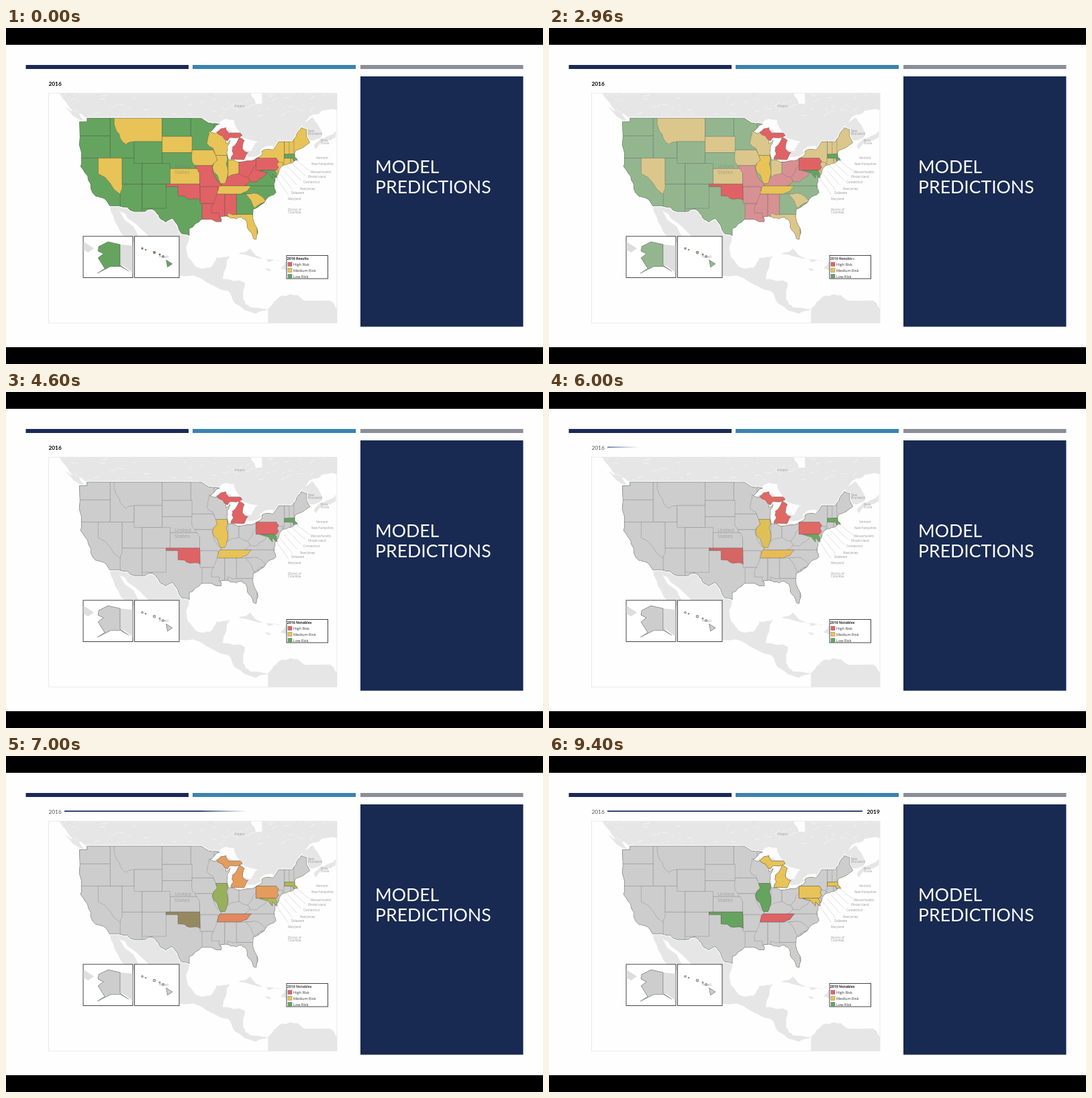
An HTML page that plays this animation: 800 px wide and 500 px high, repeating every 9480 ms.

```html
<!DOCTYPE html>
<html lang="en">
<head>
<meta charset="utf-8">
<title>Model predictions</title>
<style>
  html, body { margin: 0; width: 100%; height: 100%; overflow: hidden; background: #000; }
  svg { display: block; width: 100%; height: 100%; }
  text { font-family: "Open Sans", sans-serif; }
  .title, .year { font-family: Lato, sans-serif; }
  .title { font-size: 26.6px; fill: #fff; }
  .year { font-size: 8.3px; }
  .bold { font-weight: 700; }
  .legend { font-size: 5.6px; fill: #333; }
  .heading { font-size: 5.2px; font-weight: 700; fill: #222; }
  .place { font-size: 4.4px; fill: #999; }
  .country { font-size: 8px; fill: #777; opacity: .5; }
  .states { stroke: #444b46; stroke-opacity: .5; stroke-width: .7; stroke-linejoin: round; }
  #grey { fill: #cdcdcd; stroke: #777; }
</style>
</head>
<body>
<svg viewBox="0 0 800 500" preserveAspectRatio="none">
  <defs>
    <clipPath id="frame"><path d="M64 97H493V439H64Z"/></clipPath>
    <clipPath id="inside"></clipPath>
    <linearGradient id="wipe" gradientUnits="userSpaceOnUse" y1="0" y2="0">
      <stop offset="0" stop-color="#1b2d5c"/>
      <stop offset="1" stop-color="#2f5f95" stop-opacity="0"/>
    </linearGradient>
  </defs>
  <rect y="25" width="800" height="450" fill="#fefefe"/>
  <path fill="#1a2a54" d="M29.500 55H272V61H29.500Z"/>
  <path fill="#3a83ae" d="M278 55H521V61H278Z"/>
  <path fill="#8b8e96" d="M528 55H770.500V61H528Z"/>
  <path fill="#182952" d="M528 72H770.500V444.500H528Z"/>
  <text class="title" x="550" y="216">MODEL</text>
  <text class="title" x="550" y="245.500">PREDICTIONS</text>

  <g clip-path="url(#frame)">
    <g id="land" fill="#e6e6e6"></g>
    <g id="water" fill="#fdfdfd"></g>
    <g id="halo" fill="#fff" stroke="#fff" stroke-width="2.800"></g>
  </g>
  <rect x="63.500" y="97" width="429.500" height="342" fill="none" stroke="#e4e4e4" stroke-width=".8"/>

  <g fill="#fff" stroke="#444">
    <rect x="115" y="310" width="74" height="61.500"/>
    <rect x="191.500" y="310" width="66.500" height="61.500"/>
    <rect x="418" y="338.500" width="61.500" height="34.500"/>
  </g>
  <path fill="#dedede" d="M170 322L188.500 324V364L175 354 170 353ZM115.500 318L131 328 122 334 115.500 330Z"/>

  <g class="states">
    <g clip-path="url(#inside)"><g id="before"></g><g id="grey"></g></g>
    <g id="coast" fill="none"></g>
    <g id="notable"></g>
    <g id="later"></g>
  </g>
  <g id="labels"></g>

  <text class="year bold" id="yearBold" x="63.500" y="85.500">2016</text>
  <text class="year" id="yearPlain" x="63.500" y="85.500" fill="#555">2016</text>
  <path d="M87 81.200H467V82.900H87Z" fill="url(#wipe)"/>
  <text class="year bold" id="yearEnd" x="473.500" y="85.500">2019</text>

  <g class="heading">
    <text id="results" x="418.800" y="345">2016 Results</text>
    <text id="notables" x="418.800" y="345">2016 Notables</text>
    <text id="notablesEnd" x="418.800" y="345">2019 Notables</text>
  </g>
  <g id="legend" class="legend"></g>
</svg>
<script>
const $ = id => document.getElementById(id);
const HIGH = "#e06265", MEDIUM = "#e8c357", LOW = "#65a45e";

let seed = 7;
const random = () => (seed = seed * 16807 % 2147483647) / 2147483647;

function add(parent, tag, attributes, text = "") {
  const node = document.createElementNS("http://www.w3.org/2000/svg", tag);
  for (const key in attributes) node.setAttribute(key, attributes[key]);
  node.textContent = text;
  $(parent).append(node);
}

// Mercator: degrees west and north to stage pixels.
const project = (west, north) =>
  [851.4 - 5.95 * west, 469.5 - 341 * Math.asinh(Math.tan(north * Math.PI / 180))];

// Splits slanted edges at a displaced midpoint; edges along a meridian or parallel stay straight.
const roughen = points => points.flatMap(([x, y], i) => {
  const [nextX, nextY] = points[(i + 1) % points.length];
  const dx = nextX - x, dy = nextY - y;
  if (Math.min(Math.abs(dx), Math.abs(dy)) < 0.8) return [[x, y]];
  const push = (random() - 0.5) * 0.28;
  return [[x, y], [x + dx / 2 - dy * push, y + dy / 2 + dx * push]];
});

// A closed path from "west north, west north, ...".
function shape(text) {
  const corners = text.split(",").map(pair => project(...pair.trim().split(" ").map(Number)));
  const points = roughen(roughen(corners));
  return "M" + points.map(p => p.map(v => v.toFixed(1)).join(" ")).join("L") + "Z";
}
const box = (west, north, east, south) =>
  shape(`${west} ${north}, ${east} ${north}, ${east} ${south}, ${west} ${south}`);
const dot = (x, y, r) => `M${x - r} ${y}a${r} ${r} 0 1 0 ${2 * r} 0a${r} ${r} 0 1 0 ${-2 * r} 0Z`;

const land = text => add("land", "path", { d: shape(text) });
const water = text => add("water", "path", { d: shape(text) });

// Later areas cover earlier ones; all are cut off at the coast.
function area(risk, d) {
  add("before", "path", { d, fill: risk });
  add("grey", "path", { d });
}
function notable(risk, later, d) {
  add("notable", "path", { d, fill: risk });
  add("later", "path", { d, fill: later });
}

// Canada, Mexico to Panama, South America, islands
land("133 54, 128 51.5, 123 49, 117 46, 84 45.8, 82.5 42, 74 44.5, 66 45.2, 64 46, 65 48, 66.5 49.1, 70 47, 67 49.3, 64 50.2, 59 50.3, 59 54");
land("66 44.3, 65.5 43.6, 60.5 45.8, 60.5 46.9, 64.5 45.4");
land("128.3 50.8, 125.2 50, 123.5 48.4");
land("117.1 32.5, 106.5 32, 97.2 26, 97.5 21, 95.5 18.8, 92 18.6, 90.4 21, 87 21.5, 88.8 15.9, 83.3 15, 83.7 11, 82 9, 77.5 8.5, 80.5 7.4, 85.8 10, 87.5 13, 94.5 16.2, 101.5 17.6, 105.5 20, 105.5 22.5, 112.8 30, 114.8 31.7, 109.5 23.2, 112 25, 115 28");
land("77.5 8.6, 75.5 10.7, 72 12.2, 70 12, 68 10.6, 62 10.7, 59 8, 59 4, 77.5 4");
land("84.9 21.9, 82 23.1, 74.2 20.2, 77.5 19.9, 78 20.7");
land("74.4 18.4, 73.2 19.9, 70 19.7, 68.5 18.5, 71 18");
[[78.3, 18.4], [67.3, 18.5]].forEach(([w, n]) => land(`${w} ${n}, ${w - 1.7} ${n - 0.2}, ${w - 1} ${n - 0.6}`));
for (let i = 0; i < 70; i++) {
  const length = 1 + 5 * random();
  add("water", "ellipse", {
    cx: 75 + 400 * random(), cy: 98 + 34 * random(), rx: length, ry: 0.7,
    opacity: 0.45, style: "transform-box:fill-box;transform:rotate(" + (random() * 70 - 60) + "deg)"
  });
}

// Great Lakes and James Bay
water("92 46.7, 88 48.9, 86 48.7, 84.5 46.6, 88 47.2");
water("87.7 41.8, 87.6 44, 87 45.5, 85 46.1, 86.6 43");
water("84.3 46, 80 45, 81.7 43.3, 83.9 43.7");
water("83.4 41.6, 80 42, 78.9 42.9, 82.5 42.2");
water("79.7 43.3, 79 43.7, 76.4 44.3, 76.2 43.5");
water("82 54, 80.5 51.2, 79 51.3, 79 54");

// Lower 48 from Cape Flattery clockwise, then the two insets
const country = shape("124.7 48.4, 122.8 48.4, 122.8 49, 95.2 49, 91.4 48.1, 89.6 48, 92 46.7, 88 46.2, 88 44.6, 87 45.2, 87.8 43, 87.4 41.7, 82.7 41.5, 81.7 41.5, 78.9 42.8, 79 43.3, 76.3 43.5, 74.8 45, 71.4 45, 70 46.7, 69.2 47.4, 67.8 47.1, 67 44.8, 70.5 43.4, 70.8 42.3, 70.6 41.6, 72 41, 74 40.5, 74.9 39, 76 37, 75.5 35.3, 77.9 33.9, 81.2 31.8, 81.3 30, 80 26.8, 80.4 25.2, 81.2 25.4, 82.7 27.8, 82.9 29.2, 84.1 30.1, 85.4 29.7, 88 30.3, 89.4 30.2, 89.2 29.1, 94.2 29.6, 97.2 27.6, 97.2 26, 99.2 26.5, 101.4 29.8, 103.1 29, 104.9 30.6, 106.5 31.8, 108.2 31.3, 111 31.3, 114.8 32.5, 117.1 32.5, 118.5 34, 120.6 34.5, 122.5 37.8, 124.4 40.4, 124.2 43")
  + "M138 325L152 318 170 322V353L183 362 171 355 156 355 136 365 147 358 137 342 145 336 137 332Z"
  + "M238.500 345L248 351 240.500 356Z"
  + dot(203, 328, 1.5) + dot(208, 330, 1) + dot(221, 334, 2) + dot(229, 337, 1.3) + dot(234, 340, 1.7);
for (const id of ["inside", "halo", "coast"]) add(id, "path", { d: country });
area(LOW, country);

// West
area(LOW, box(125, 49, 117, 46));
area(LOW, box(125, 46, 117, 42));
area(LOW, box(117, 49, 111, 42));
area(MEDIUM, shape("116 49, 104 49, 104 45, 111 45, 113 44.5, 114.5 45.6, 116 48"));
area(LOW, box(125, 42, 114.4, 32));
area(LOW, box(114.5, 37, 109, 31));
area(MEDIUM, shape("120 42, 114 42, 114 36.2, 114.6 35, 120 39"));
area(LOW, box(114, 42, 109, 37));
area(LOW, box(111, 45, 104, 41));
// Plains
area(LOW, box(106.6, 36.5, 93.8, 25));
area(LOW, box(109, 37, 103, 32));
area(LOW, box(104, 49, 96.8, 45.9));
area(LOW, box(96.8, 50, 91, 43.5));
area(MEDIUM, box(104, 45.9, 96.5, 43));
area(LOW, box(104, 43, 95.4, 40));
area(LOW, box(109, 41, 102, 37));
area(MEDIUM, box(102, 40, 94.6, 37));
area(MEDIUM, shape("92.3 46.8, 87 46, 87 42.5, 90.6 42.5, 92.8 44.7"));
area(MEDIUM, shape("96.5 43.5, 91.2 43.5, 90.2 41.8, 91.5 40.6, 95.8 40.6"));
// South
area(HIGH, box(94.5, 36.5, 90, 33));
area(HIGH, box(94, 33, 89, 29));
area(HIGH, shape("95.8 40.6, 91.5 40.6, 89.2 37, 89.7 36, 90.2 36.5, 94.6 36.5, 94.6 39.1"));
area(HIGH, shape("90.2 35, 88.3 35, 88.3 30, 89.7 30, 89.7 31, 91.6 31, 91.1 33"));
area(HIGH, box(88.3, 35, 85.3, 30));
area(LOW, box(83.7, 39.3, 75, 36.6));
area(LOW, box(84.3, 36.6, 75, 33));
area(LOW, box(85.4, 35, 80, 30.7));
area(MEDIUM, shape("83.1 35, 81 35.2, 79.7 34.8, 78 33.5, 80.9 32"));
area(MEDIUM, shape("87.6 31, 84.9 30.7, 80 30.7, 79 24, 87.6 24"));
// East
area(HIGH, box(84.8, 42, 80.5, 38.2));
area(MEDIUM, box(87.5, 41.7, 84.8, 37.8));
area(HIGH, shape("89.3 36.6, 83.6 36.6, 82 37.5, 82.7 38.4, 84.8 39.1, 88 37.9"));
area(HIGH, shape("82.6 38.3, 80.6 40.6, 79.5 39.5, 77.8 39.4, 80.3 37.4, 82 37.5"));
area(MEDIUM, box(79.8, 45, 73.4, 40.4));
area(MEDIUM, box(73.4, 45, 72, 42.7));
area(MEDIUM, box(72.2, 46, 70.6, 42.7));
area(MEDIUM, box(71, 48, 66, 43));
area(MEDIUM, box(73.5, 42, 71.8, 40.4));
area(MEDIUM, box(71.8, 42, 71.1, 41));
area(MEDIUM, box(75.4, 41.2, 73.8, 38.8));
area(MEDIUM, box(75.8, 39.8, 75, 38.4));

notable(HIGH, LOW, shape("103 37, 94.6 37, 94.5 33.7, 97 33.9, 100 34.6, 100 36.5, 103 36.5"));
notable(MEDIUM, LOW, shape("90.6 42.5, 87.8 42.5, 87.5 39.3, 88.3 37.1, 89.4 37.1, 91.4 40.2, 90.2 41.6"));
notable(MEDIUM, HIGH, shape("89.6 36.6, 81.7 36.6, 84.3 35, 90.2 35"));
notable(HIGH, MEDIUM, shape("86.8 41.8, 83.5 41.7, 82.5 43, 83.9 43.7, 83.4 45.2, 84.7 45.8, 86.4 44, 86.2 42.7"));
notable(HIGH, MEDIUM, shape("90.4 46.6, 88 47.4, 87.4 46.5, 84.5 46.5, 84 46, 87 45.7, 87.6 45.1"));
notable(HIGH, MEDIUM, shape("80.5 42, 75.4 42, 74.8 41.3, 75.2 40.7, 74.8 40.2, 75.4 39.7, 80.5 39.7"));
notable(LOW, MEDIUM, shape("79.5 39.7, 75.8 39.7, 75.2 38.2, 76.4 39, 76.4 38.2, 77.5 39.2"));
notable(LOW, MEDIUM, shape("73.4 42.7, 70.8 42.8, 70.8 42.1, 70 41.6, 71.2 41.6, 71.3 42, 73.4 42"));

function label(x, y, text, kind = "place") {
  text.split("|").forEach((line, i) =>
    add("labels", "text", { x, y: y + i * (kind === "place" ? 4.3 : 8.5), class: kind }, line));
}
label(340, 117.5, "Ontario");
label(450, 155, "New|Brunswick");
label(469, 168.5, "Nova|Scotia");
label(462, 195, "Vermont");
label(455, 204, "New Hampshire");
label(454, 215.5, "Massachusetts");
label(450, 222.5, "Rhode Island");
label(443, 231, "Connecticut");
label(438, 240.5, "New Jersey");
label(425, 246.5, "Delaware");
label(420, 255.5, "Maryland");
label(420, 271.5, "District of|Columbia");
label(228, 342, "Hawaii");
label(251, 208, "United|States", "country");
for (let i = 0; i < 6; i++) {
  add("labels", "path", { d: `M${430 - i * 5.4} ${195 + i * 5.6}L${453 - i * 6.5} ${213 + i * 7}`, stroke: "#ccc", "stroke-width": 0.6 });
}

[["High Risk", HIGH], ["Medium Risk", MEDIUM], ["Low Risk", LOW]].forEach(([name, fill], i) => {
  const y = 348.7 + i * 8.8;
  add("legend", "rect", { x: 420, y, width: 6, height: 6, fill, stroke: "#666", "stroke-width": 0.4 });
  add("legend", "text", { x: 428, y: y + 5.3 }, name);
});

const ramp = (t, from, to) => Math.min(1, Math.max(0, (t - from) / (to - from)));
const show = (id, opacity) => $(id).setAttribute("opacity", opacity);

function draw() {
  const t = performance.now() % 9480;
  const fade = ramp(t, 2510, 3510);
  const dim = ramp(t, 5400, 5950);
  const shift = ramp(t, 5870, 7760);
  const edge = 87 + 450 * ramp(t, 5790, 7790);
  show("grey", fade);
  show("later", shift);
  show("results", 1 - fade);
  show("notables", fade * (1 - shift));
  show("notablesEnd", shift);
  show("yearBold", 1 - dim);
  show("yearPlain", dim);
  show("yearEnd", ramp(t, 7200, 7700));
  $("wipe").setAttribute("x1", edge - 70);
  $("wipe").setAttribute("x2", edge);
  requestAnimationFrame(draw);
}
draw();
</script>
</body>
</html>
```
